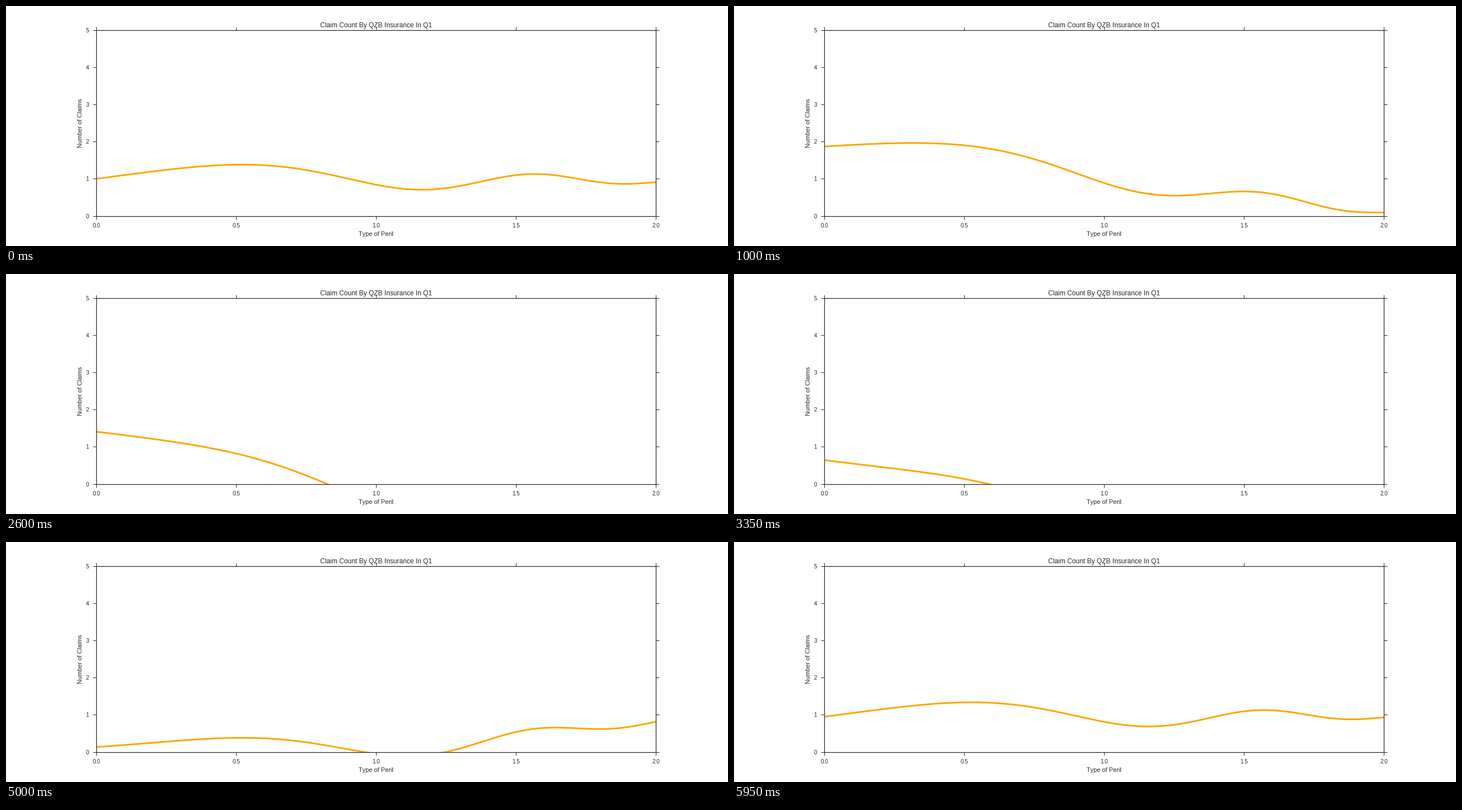
These frames come from a looping animation (1280 by 427 pixels, 6 s). A matplotlib script:

```python
import matplotlib.pyplot as plt
import numpy as np
from matplotlib.animation import FuncAnimation

W, H, DPI = 1280, 427, 72
FPS, DURATION = 20, 6
K = 80 / 81  # point scale of the whole chart
INK = "0.15"

plt.rcParams.update({
    "font.family": "Liberation Sans",
    "text.color": INK,
    "text.kerning_factor": 6,
    "axes.edgecolor": INK,
    "axes.labelcolor": INK,
    "axes.linewidth": 1.25 * K,
    "axes.labelsize": 11 * K,
    "axes.titlesize": 12 * K,
})

fig, ax = plt.subplots(figsize=(W / DPI, H / DPI), dpi=DPI, facecolor="white")
fig.subplots_adjust(left=0.125, right=0.9, bottom=0.125, top=0.9)

ax.set(xlim=(0, 2), ylim=(0, 5), xticks=np.arange(0, 2.1, 0.5), yticks=range(6))
ax.tick_params(direction="out", top=True, right=True, length=6 * K, width=K,
               pad=7 * K, labelsize=10 * K, color=INK, labelcolor=INK)
ax.set_title("Claim Count By QZB Insurance In Q1", y=1.0, pad=5 * K)
ax.set_xlabel("Type of Peril", labelpad=5 * K)
ax.set_ylabel("Number of Claims", labelpad=5 * K)

x = np.linspace(-2, 2, 200)
line, = ax.plot(x, np.zeros_like(x), color="orange", lw=3 * K)


def update(i):
    phase = 2 * np.pi * i / (FPS * DURATION)
    line.set_ydata(np.sinc(x**2) + np.sin(x + phase))
    return line,


anim = FuncAnimation(fig, update, frames=FPS * DURATION, interval=1000 / FPS,
                     repeat=True, repeat_delay=0)
plt.show()
```
